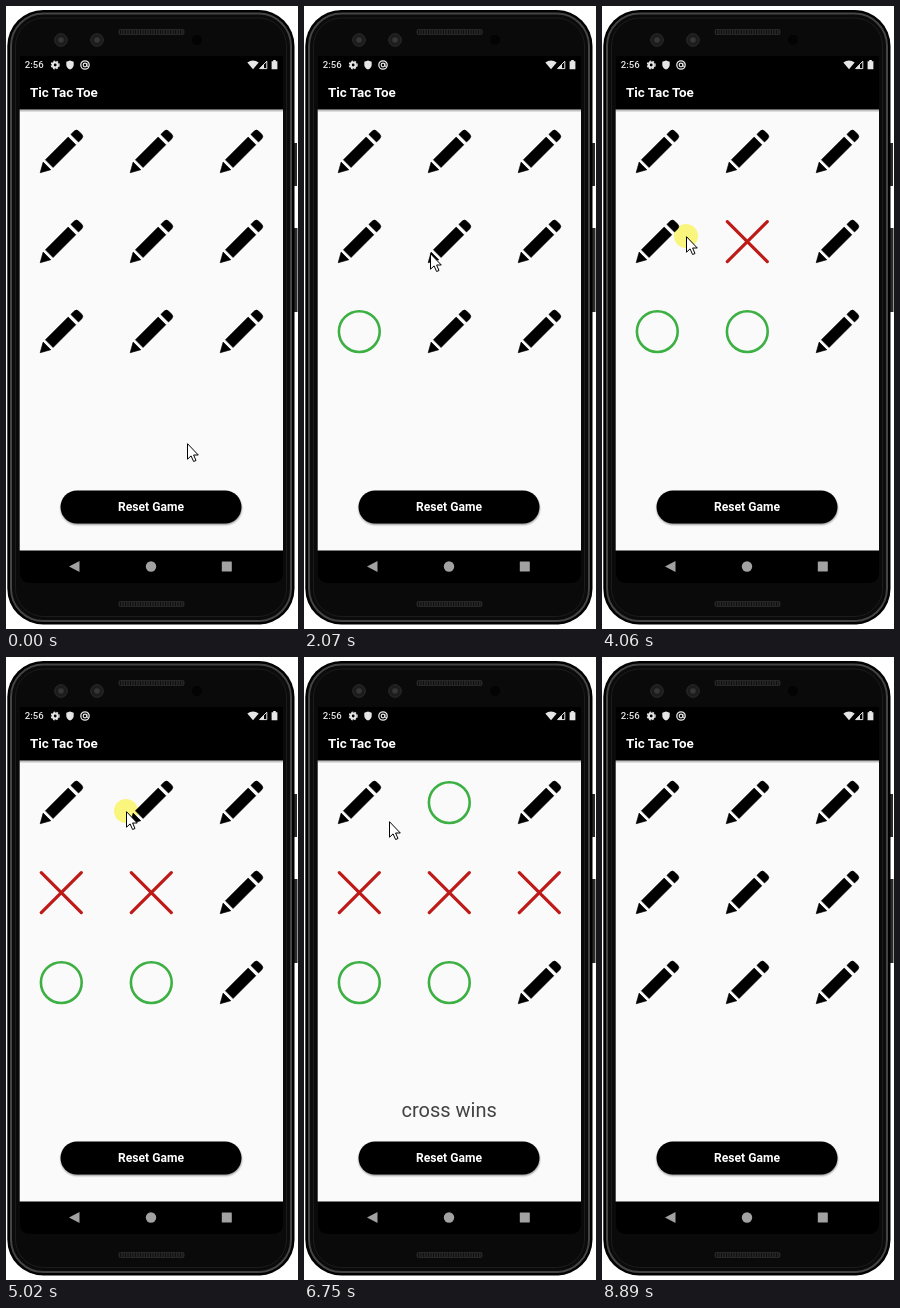
An HTML page that plays this animation: 292x623 px, repeating every 9.56 s.

```html
<!DOCTYPE html>
<html lang="en">
<head>
<meta charset="utf-8">
<title>Tic Tac Toe</title>
<style>
  html, body { margin: 0; width: 100%; height: 100%; overflow: hidden; background: #fff; }
  svg { display: block; width: 292px; height: 623px; }
  text { font-family: Roboto, "Open Sans", sans-serif; }
  #halo { mix-blend-mode: multiply; }
</style>
</head>
<body>
<svg viewBox="0 0 292 623" xmlns="http://www.w3.org/2000/svg">
  <defs>
    <linearGradient id="shade" x1="0" y1="0" x2="0" y2="1">
      <stop offset="0" stop-opacity=".34"/>
      <stop offset="1" stop-opacity="0"/>
    </linearGradient>
    <filter id="blur" x="-10%" y="-40%" width="120%" height="180%">
      <feGaussianBlur stdDeviation="1.3"/>
    </filter>
    <g id="pencil" transform="translate(-21.4 21.4) rotate(-45)">
      <path d="M.4 0 10-5.4V5.4ZM13.2-5.4H45.4V5.4H13.2ZM49.2-5.4H53.6Q57-5.4 57-2V2Q57 5.4 53.6 5.4H49.2Z"
        stroke="#000" stroke-width=".6" stroke-linejoin="round"/>
    </g>
    <path id="cross" d="M-20-20 20 20M20-20-20 20" fill="none" stroke="#bd1a18" stroke-width="3.2" stroke-linecap="round"/>
    <circle id="ring" r="20.4" fill="none" stroke="#3db043" stroke-width="2.6"/>
  </defs>

  <!-- phone -->
  <path d="M286 137H291V180H286ZM286 222H291.5V306H286Z" fill="#2b2b2b"/>
  <rect x="1.3" y="4" width="287.2" height="614.6" rx="36" fill="#000"/>
  <rect x="5" y="7.5" width="280" height="607.5" rx="32.5" fill="#0b0b0b" stroke="#444" stroke-width="2"/>
  <rect x="9.5" y="12" width="271" height="598.5" rx="28" fill="#0a0a0a" stroke="#1c1c1c"/>
  <g fill="#262626">
    <rect x="112.5" y="23" width="66" height="6" rx="2"/>
    <rect x="112.5" y="595" width="66" height="6" rx="2"/>
  </g>
  <path d="M114 26H177M114 598H177" stroke="#0e0e0e" stroke-width="4" stroke-dasharray="1 1.5"/>
  <g fill="#1c1c1c" stroke="#2c2c2c">
    <circle cx="55" cy="34" r="6.3"/>
    <circle cx="91" cy="34" r="6.3"/>
  </g>
  <g fill="#363636">
    <circle cx="55" cy="34" r="2.8"/>
    <circle cx="91" cy="34" r="2.8"/>
  </g>
  <circle cx="191" cy="34" r="5" fill="#030303"/>

  <!-- screen -->
  <path d="M14 50H277V566Q277 577 266 577H25Q14 577 14 566Z" fill="#000"/>
  <rect x="13.7" y="103.5" width="263.3" height="441" fill="#fafafa"/>
  <rect x="13.7" y="103.5" width="263.3" height="3" fill="url(#shade)"/>

  <!-- status bar -->
  <g fill="#e6e6e6">
    <text x="18.7" y="62.4" font-size="9.6" font-weight="500">2:56</text>
    <circle cx="49.2" cy="59" r="2.5" fill="none" stroke="#e6e6e6" stroke-width="2.2"/>
    <circle cx="49.2" cy="59" r="3.9" fill="none" stroke="#e6e6e6" stroke-width="1.2" stroke-dasharray="1.8 1.4"/>
    <path d="M64 54.4 67.7 55.8V58.8Q67.7 62 64 63.6Q60.3 62 60.3 58.8V55.8Z"/>
    <circle cx="79" cy="59" r="4.2" fill="none" stroke="#e6e6e6" stroke-width="1.3"/>
    <circle cx="79" cy="59" r="1.8" fill="none" stroke="#e6e6e6" stroke-width="1.2"/>
    <path d="M80.9 57V60L83 61" fill="none" stroke="#e6e6e6"/>
    <path d="M241.3 56.6Q247 52.2 252.7 56.6L247 63.2Z"/>
    <path d="M253.6 62.6 260.8 55.2V62.6Z" fill="none" stroke="#e6e6e6"/>
    <path d="M253.6 62.6 258 58.2V62.6Z"/>
    <path d="M265.6 55.2H267.2V54H269.8V55.2H271.4V63.2H265.6Z"/>
  </g>
  <text x="24" y="90.8" font-size="13.4" font-weight="600" fill="#fff">Tic Tac Toe</text>

  <g id="board"></g>
  <text id="result" x="145.2" y="460" font-size="20" text-anchor="middle" fill="#424242">cross wins</text>

  <rect x="55" y="486.5" width="180.5" height="32" rx="16" opacity=".5" filter="url(#blur)"/>
  <rect x="54.5" y="484.5" width="181" height="33" rx="16.5"/>
  <text x="145" y="505.2" font-size="12.1" font-weight="600" text-anchor="middle" fill="#fff">Reset Game</text>

  <!-- navigation bar -->
  <g fill="#a2a2a2">
    <path d="M63 560.5 73.5 555V566Z"/>
    <circle cx="145" cy="560.5" r="5.2"/>
    <rect x="215.8" y="555.5" width="10" height="10" rx=".6"/>
  </g>

  <circle id="halo" r="12" fill="#fffa80"/>
  <path id="cursor" d="M.5.7V16.2L4.1 12.9 6.6 18.5 9 17.5 6.6 12H11.3Z" fill="#fff" stroke="#000" stroke-linejoin="round"/>
</svg>

<script>
const LOOP = 9560, WIN = 6350, RESET = 7350, EXIT = 8890;

// press time, release time, cell, mark
const taps = [
  [1180, 1400, 6, 'ring'],
  [2280, 2460, 4, 'cross'],
  [3110, 3320, 7, 'ring'],
  [4060, 4260, 3, 'cross'],
  [5020, 5250, 1, 'ring'],
  [6110, 6320, 5, 'cross']
];

// time, x, y of the cursor tip
const path = [
  [0, 181, 437], [140, 181, 437], [690, 92, 293], [920, 80, 311],
  [1800, 80, 311], [2070, 126, 247],
  [2600, 126, 247], [2910, 134, 308],
  [3470, 134, 308], [3820, 84, 230],
  [4440, 84, 230], [4840, 120, 154],
  [5450, 120, 154], [5900, 215, 236],
  [6400, 215, 236], [6630, 118, 146], [6750, 85, 164], [6960, 53, 225],
  [7620, 110, 394], [8220, 237, 528], [EXIT, 262, 624]
];

const $ = id => document.getElementById(id);

function make(tag, attrs, parent) {
  const el = document.createElementNS('http://www.w3.org/2000/svg', tag);
  for (const k in attrs) el.setAttribute(k, attrs[k]);
  return parent.appendChild(el);
}

const cells = Array.from({ length: 9 }, (_, i) => {
  const x = 13.7 + i % 3 * 90, y = 103.7 + Math.floor(i / 3) * 90;
  const ink = make('rect', { x, y, width: 83, height: 83, fill: '#000', opacity: 0 }, $('board'));
  const mark = make('use', { href: '#pencil', x: x + 41.6, y: y + 41.9 }, $('board'));
  return { ink, mark };
});

const slope = (i, k) => i < 0 || i >= path.length - 1 ? 0 :
  (path[i + 1][k] - path[i][k]) / (path[i + 1][0] - path[i][0]);

// tangent that never overshoots a stop or a turning point
function tangent(i, k) {
  const a = slope(i - 1, k), b = slope(i, k);
  if (i === path.length - 1) return a;
  return a * b <= 0 ? 0 : 2 * a * b / (a + b);
}

function cursorAt(t) {
  let i = 0;
  while (i < path.length - 2 && path[i + 1][0] <= t) i++;
  const span = path[i + 1][0] - path[i][0];
  const s = Math.min(1, (t - path[i][0]) / span), r = 1 - s;
  return [1, 2].map(k =>
    path[i][k] * (1 + 2 * s) * r * r + tangent(i, k) * span * s * r * r +
    path[i + 1][k] * s * s * (3 - 2 * s) - tangent(i + 1, k) * span * s * s * r);
}

function draw(t) {
  const [x, y] = cursorAt(t).map(Math.round);
  const place = `translate(${x} ${y})`;
  $('cursor').setAttribute('transform', place);
  $('halo').setAttribute('transform', place);
  $('cursor').style.display = t < EXIT ? '' : 'none';
  $('halo').style.display = taps.some(([on, off]) => t >= on && t < off) ? '' : 'none';
  $('result').style.display = t >= WIN && t < RESET ? '' : 'none';

  for (const [, off, n, kind] of taps) {
    const { ink, mark } = cells[n];
    const age = t - off;
    const marked = age >= 30 && t < RESET;
    mark.setAttribute('href', marked ? '#' + kind : '#pencil');
    ink.setAttribute('opacity', age >= 0 && age < 260 ? 0.035 * (1 - age / 260) : 0);
  }
}

const start = performance.now();
function tick() {
  draw((performance.now() - start) % LOOP);
  requestAnimationFrame(tick);
}
tick();
</script>
</body>
</html>
```
